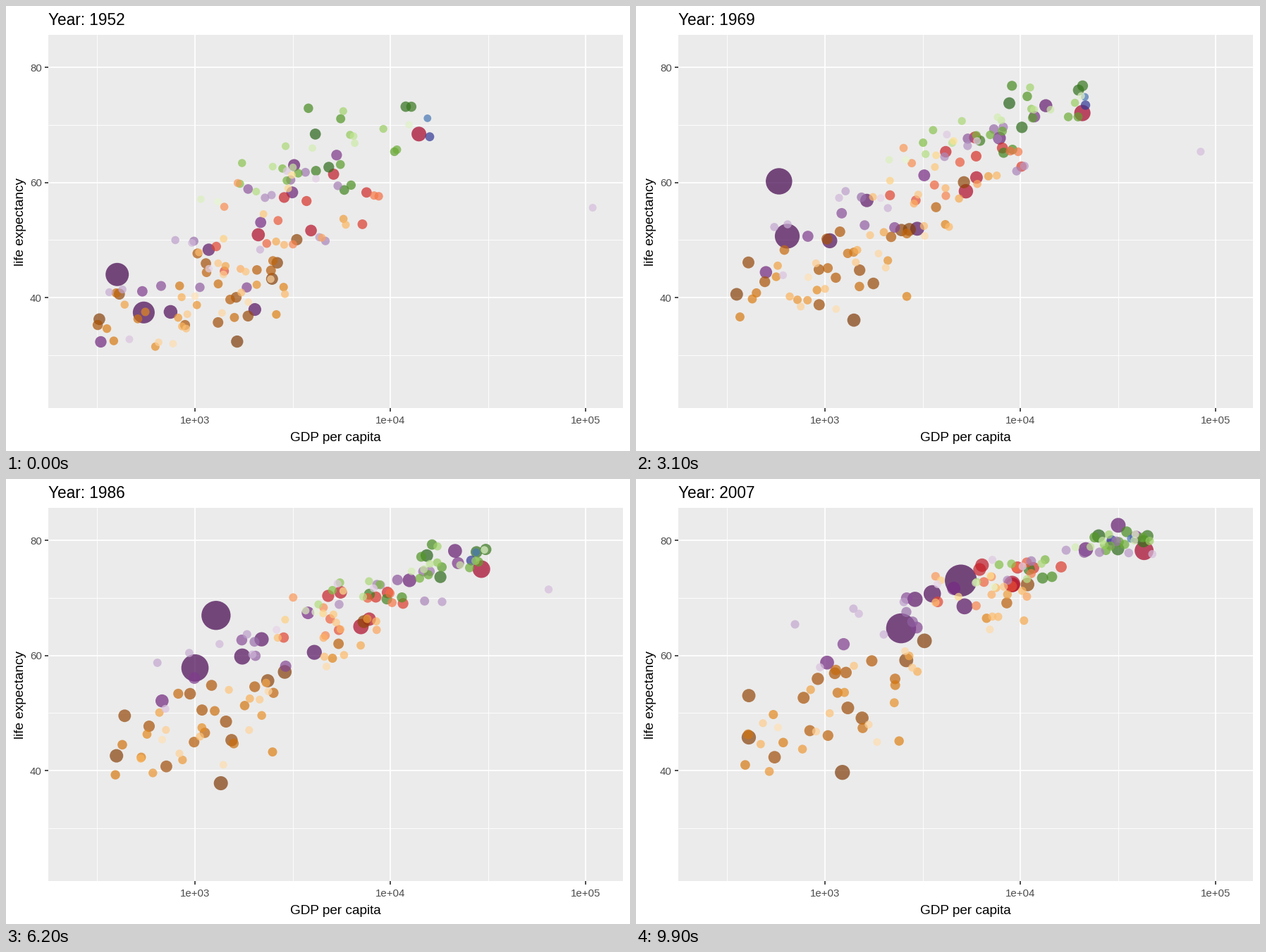
Recreate the animation shown at these times as a matplotlib script. Size 885x632 px, loop 10 s.

```python
import numpy as np
import matplotlib.pyplot as plt
from matplotlib.animation import FuncAnimation
from matplotlib.colors import LinearSegmentedColormap

W, H, DPI = 885, 632, 100
FRAMES, INTERVAL = 100, 100
PX = 72 / DPI
STEPS = 11
LEFT, TOP, RIGHT, BOTTOM = 60, 41, 875, 571

rng = np.random.default_rng(12)
plt.rcParams["font.family"] = "Liberation Sans"

# colour ramp from most to least populous, and the largest crowd member in millions
REGIONS = {
    "asia": (["#40004B", "#762A83", "#9970AB", "#C2A5CF", "#E7D4E8"], 170),
    "africa": (["#7F3B08", "#B35806", "#E08214", "#FDB863", "#FEE0B6"], 135),
    "americas": (["#A50026", "#D73027", "#F46D43", "#FDAE61", "#FEE090"], 109),
    "europe": (["#276419", "#4D9221", "#7FBC41", "#B8E186", "#E6F5D0"], 82),
    "oceania": (["#313695", "#4575B4"], 20),
}

# region, population, (income, life) at start and end, easing power of each
HEROES = [
    ("asia", 1319, (400, 44.0), (4959, 73.0), (1.65, 0.5)),
    ("asia", 1110, (547, 37.4), (2452, 64.7), (1.95, 0.62)),
    ("asia", 224, (750, 37.5), (3541, 70.7), (1.3, 0.85)),
    ("asia", 127, (3217, 63.0), (31656, 82.6), (0.4, 0.55)),
    ("asia", 2.5, (108400, 55.6), (47300, 77.6), (1, 0.7)),
    ("americas", 301, (13990, 68.4), (42952, 78.2), (0.9, 0.85)),
    ("americas", 190, (2109, 50.9), (9066, 72.4), (0.4, 0.9)),
]

# region, count, centre at start and end
CROWDS = [
    ("asia", 8, (2900, 56), (25000, 78)),
    ("asia", 8, (1900, 50), (5600, 72)),
    ("asia", 12, (800, 42), (2000, 65)),
    ("africa", 42, (900, 39), (1150, 52)),
    ("africa", 10, (2100, 45), (6500, 68)),
    ("americas", 23, (3100, 54), (7800, 73)),
    ("europe", 19, (6900, 67), (30000, 79.6)),
    ("europe", 11, (3000, 60), (11500, 75)),
    ("oceania", 2, (10300, 69), (29500, 80.5)),
]


def to_px(log_income, life):
    return 268 + 277.2 * (log_income - 3), 87 + 8.175 * (80 - life)


def log_point(p):
    return np.array([np.log10(p[0]), p[1]])


def travel(a, b, power):
    """Eased path from a to b, sampled at each five-year step."""
    t = np.linspace(0, 1, STEPS + 1)[:, None]
    return a + (b - a) * t ** np.array(power)


def spread(life):
    """Crowds are widest at middling life expectancy."""
    return np.array([0.24 * min(1, 0.3 + (84 - life) / 30),
                     0.2 * min(84 - life, life - 17)])


def noise():
    u, v = rng.normal(size=2)
    return np.array([u, 0.55 * u + 0.83 * v])


def crowd(n, start, end):
    for _ in range(n):
        z0 = noise()
        z1 = 0.65 * z0 + 0.75 * noise()
        a = log_point(start) + np.clip(z0, -1.9, 1.9) * spread(start[1])
        b = log_point(end) + np.clip(z1, -1.9, 1.9) * spread(end[1])
        path = travel(a, b, (0.75, 0.7))
        yield path + rng.normal(size=path.shape) * (0.018, 0.35)


def build():
    """All bubbles as (population, path, colour), largest first."""
    bubbles = []
    for region, (ramp, top) in REGIONS.items():
        members = [(pop, travel(log_point(a), log_point(b), power))
                   for name, pop, a, b, power in HEROES if name == region]
        paths = [p for name, *spec in CROWDS if name == region
                 for p in crowd(*spec)]
        rng.shuffle(paths)
        members += [(top * np.exp(-5 * i / len(paths)), p)
                    for i, p in enumerate(paths)]
        members.sort(key=lambda m: -m[0])
        cmap = LinearSegmentedColormap.from_list(region, ramp)
        bubbles += [(pop, path, cmap(i / (len(members) - 1)))
                    for i, (pop, path) in enumerate(members)]
    return sorted(bubbles, key=lambda b: -b[0])


pops, paths, colors = zip(*build())
pops, paths = np.array(pops), np.array(paths)


def state(t):
    """Pixel positions and marker areas at time t in 0..1."""
    k = min(int(t * STEPS), STEPS - 1)
    f = t * STEPS - k
    x, y = (paths[:, k] * (1 - f) + paths[:, k + 1] * f).T
    radius = 5 + 0.4875 * np.sqrt(pops * (0.42 + 0.58 * t))
    return np.column_stack(to_px(x, y)), (2 * radius * PX) ** 2


fig = plt.figure(figsize=(W / DPI, H / DPI), dpi=DPI, facecolor="white")
ax = fig.add_axes([0, 0, 1, 1])
ax.set_xlim(0, W)
ax.set_ylim(H, 0)
ax.axis("off")
ax.add_patch(plt.Rectangle((LEFT, TOP), RIGHT - LEFT, BOTTOM - TOP,
                           fc="#EBEBEB", lw=0, zorder=0))


def line(xs, ys, width, color="white"):
    ax.plot(xs, ys, color=color, lw=width * PX, zorder=1, solid_capstyle="butt")


def label(x, y, text, size, color="black", ha="center", **kw):
    return ax.text(x, y, text, fontsize=size * PX, color=color, ha=ha,
                   va="baseline", **kw)


def grid_x(v, width):
    x = to_px(v, 0)[0]
    line([x, x], [TOP, BOTTOM], width)
    return x


def grid_y(v, width):
    y = to_px(0, v)[1]
    line([LEFT, RIGHT], [y, y], width)
    return y


for i in range(3):
    grid_x(2.5 + i, 0.9)
    grid_y(30 + 20 * i, 0.9)
for i in range(3):
    x, y = grid_x(3 + i, 1.7), grid_y(40 + 20 * i, 1.7)
    line([x, x], [BOTTOM, BOTTOM + 4.6], 1.7, "#333333")
    line([LEFT - 4.6, LEFT], [y, y], 1.7, "#333333")
    label(x, 593, f"1e+0{3 + i}", 15, "#4D4D4D")
    label(51, y + 6, str(40 + 20 * i), 15, "#4D4D4D", "right")

label(467.5, 618, "GDP per capita", 19)
label(25, 306.5, "life expectancy", 19, rotation=90, rotation_mode="anchor")
title = label(60, 27, "", 22.6, ha="left")

start_xy, start_area = state(0)
dots = ax.scatter(*start_xy.T, s=start_area, c=colors, alpha=0.7,
                  linewidths=0, zorder=3)


def update(i):
    t = i / (FRAMES - 1)
    xy, area = state(t)
    dots.set_offsets(xy)
    dots.set_sizes(area)
    title.set_text(f"Year: {round(1952 + 55 * t)}")
    return dots, title


anim = FuncAnimation(fig, update, frames=FRAMES, interval=INTERVAL,
                     repeat=True, repeat_delay=0, blit=False)
plt.show()
```
